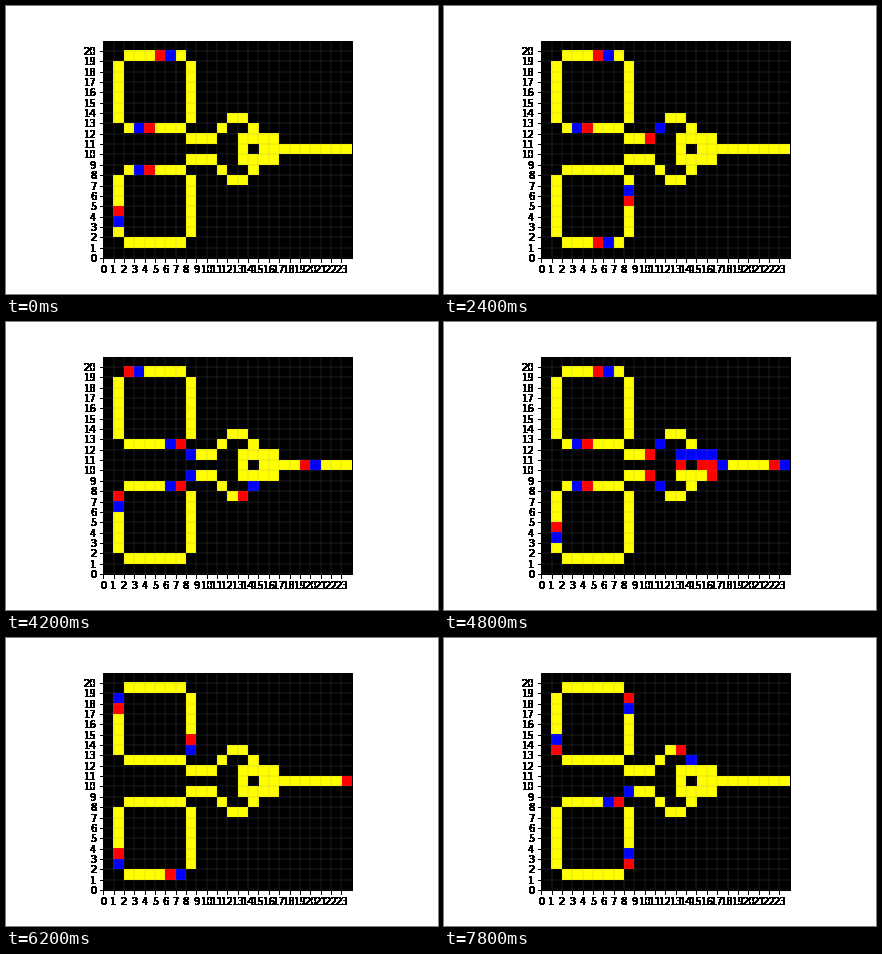
These frames come from a looping animation (432x288 px, 8 s). A matplotlib script:

```python
"""Wireworld: two clock loops feeding an XOR gate."""
import matplotlib.pyplot as plt
import numpy as np
from matplotlib.animation import FuncAnimation
from matplotlib.colors import ListedColormap

EMPTY, HEAD, TAIL, WIRE = range(4)
COLORS = ListedColormap(["#000000", "#0000ff", "#ff0000", "#ffff00"])
COLS, ROWS = 24, 21
STEPS = 40


def first_state():
    grid = np.full((ROWS, COLS), EMPTY)
    for low in (1, 12):  # clock loops
        grid[[low, low + 7], 2:8] = WIRE
    for low in (2, 13):
        grid[low:low + 6, [1, 8]] = WIRE
    for side in (-1, 1):  # gate inputs, mirrored about row 10
        grid[10 + side, 8:11] = WIRE
        grid[10 + 2 * side, [11, 14]] = WIRE
        grid[10 + 3 * side, 12:14] = WIRE
    grid[9:12, 13:17] = WIRE
    grid[10, 14] = EMPTY
    grid[10, 17:] = WIRE
    # electrons: head and tail as (column, row)
    for head, tail in [((6, 19), (5, 19)), ((3, 12), (4, 12)),
                       ((3, 8), (4, 8)), ((1, 3), (1, 4))]:
        grid[head[::-1]] = HEAD
        grid[tail[::-1]] = TAIL
    return grid


def step(grid):
    heads = np.pad((grid == HEAD).astype(int), 1)
    near = sum(heads[r:r + ROWS, c:c + COLS]
               for r in range(3) for c in range(3))
    new = grid.copy()
    new[grid == HEAD] = TAIL
    new[grid == TAIL] = WIRE
    new[(grid == WIRE) & ((near == 1) | (near == 2))] = HEAD
    return new


def harden(img, dpi):
    """Make every touched pixel fully opaque."""
    out = img.copy()
    out[..., 3] = out[..., 3] > 0
    return out, 0, 0


states = [first_state()]
while len(states) < STEPS:
    states.append(step(states[-1]))

plt.rcParams.update({"font.family": "DejaVu Sans", "font.size": 10,
                     "figure.subplot.bottom": 0.125})
fig, ax = plt.subplots(figsize=(6, 4), dpi=72)
image = ax.imshow(states[0], cmap=COLORS, vmin=EMPTY, vmax=WIRE,
                  origin="lower", extent=(0, COLS, 0, ROWS),
                  interpolation="nearest")
ax.set_xticks(range(COLS))
ax.set_yticks(range(ROWS))
ax.grid(color="gray", linewidth=0.2)

for artist in (*ax.get_xticklabels(), *ax.get_yticklabels(),
               *ax.get_xticklines(), *ax.get_yticklines(),
               *ax.spines.values()):
    artist.set_agg_filter(harden)


def update(i):
    image.set_data(states[i])
    return [image]


anim = FuncAnimation(fig, update, frames=STEPS, interval=200,
                     repeat=True, repeat_delay=0)
plt.show()
```
